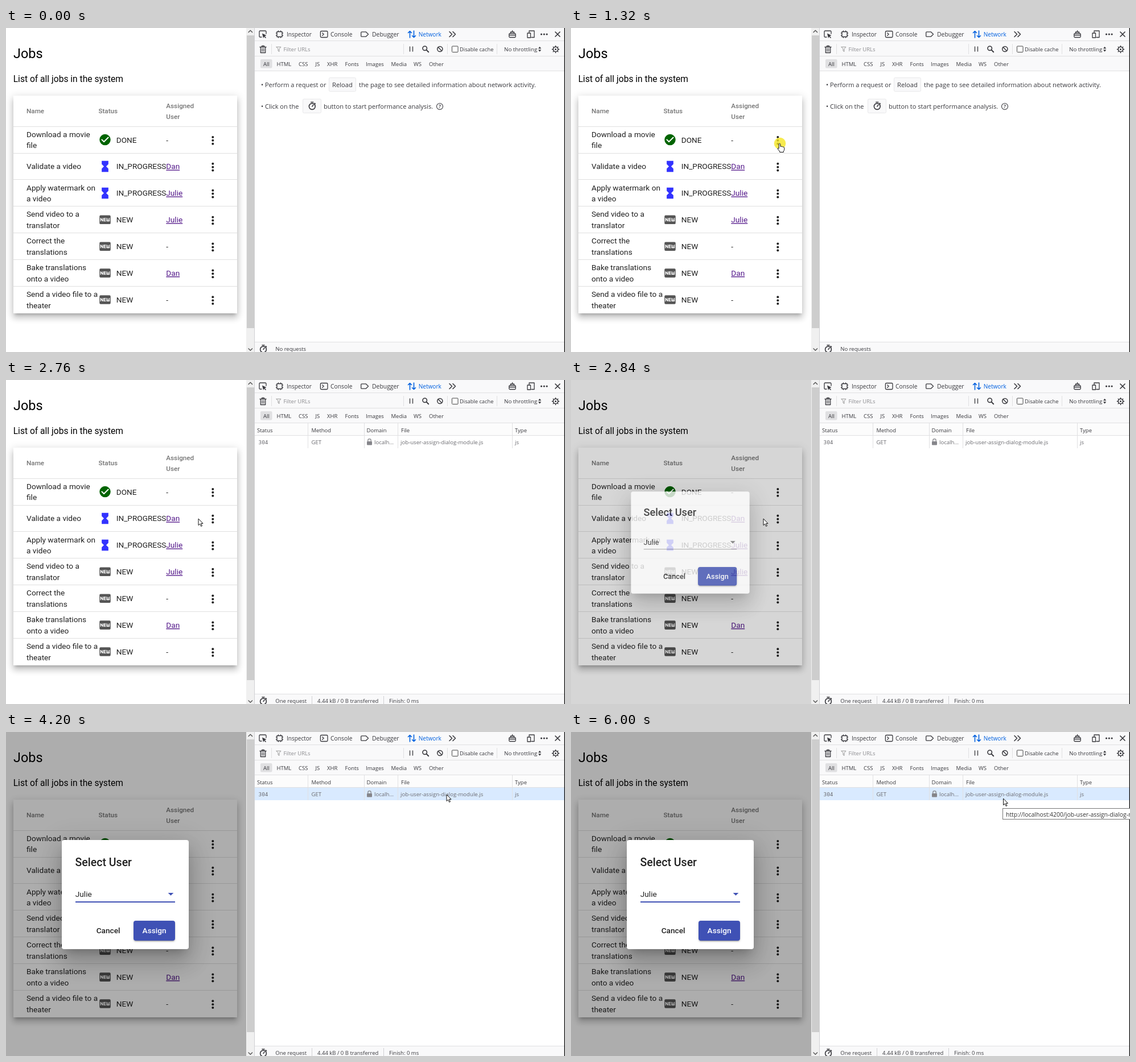
An HTML page that plays this animation: 982 by 570 pixels, repeating every 6400 ms.

```html
<!DOCTYPE html>
<html lang="en">
<head>
<meta charset="utf-8">
<title>Jobs</title>
<style>
html, body { margin: 0; width: 100%; height: 100%; overflow: hidden; background: #fff; }
svg { display: block; width: 982px; height: 570px; }
text { white-space: pre; }
.r { font-family: Roboto, sans-serif; fill: #212121; }
.o { font-family: "Open Sans", sans-serif; fill: #38383d; }
.m { font-family: "DejaVu Sans Mono", monospace; }
.b { font-weight: 500; }
.link { fill: #551a8b; text-decoration: underline; }
.ln { fill: none; stroke: #38383d; stroke-width: 1.3; stroke-linecap: round; stroke-linejoin: round; }
foreignObject { overflow: visible; }
.box { width: 100%; height: 100%; background: #fff; border-radius: 4px; }
.card { border-radius: 0; box-shadow: 0 5px 5px -3px rgba(0,0,0,.2), 0 8px 10px 1px rgba(0,0,0,.14), 0 3px 14px 2px rgba(0,0,0,.12); }
.menu { box-shadow: 0 2px 4px -1px rgba(0,0,0,.2), 0 4px 5px rgba(0,0,0,.14), 0 1px 10px rgba(0,0,0,.12); }
.dialog { box-shadow: 0 11px 15px -7px rgba(0,0,0,.2), 0 24px 38px 3px rgba(0,0,0,.14), 0 9px 46px 8px rgba(0,0,0,.12); }
.btn { background: #3f51b5; box-shadow: 0 3px 1px -2px rgba(0,0,0,.2), 0 2px 2px rgba(0,0,0,.14), 0 1px 5px rgba(0,0,0,.12); }
</style>
</head>
<body>
<svg id="stage" viewBox="0 0 982 570"></svg>
<script>
const LOOP = 6400, STEP = 40;
const stage = document.getElementById('stage');

// Markup helpers
const text = (x, y, s, size, cls = 'o', extra = '') =>
  `<text x="${x}" y="${y}" font-size="${size}" class="${cls}" ${extra}>${s}</text>`;
const rect = (x, y, w, h, fill, extra = '') =>
  `<rect x="${x}" y="${y}" width="${w}" height="${h}" fill="${fill}" ${extra}/>`;
const box = (x, y, w, h, cls) =>
  `<foreignObject x="${x}" y="${y}" width="${w}" height="${h}"><div class="box ${cls}"></div></foreignObject>`;
const line = (d, extra = '') => `<path class="ln" d="${d}" ${extra}/>`;
const at = (x, y, body) => `<g transform="translate(${x} ${y})">${body}</g>`;
const group = (id, body, extra = '') => `<g id="${id}" ${extra}>${body}</g>`;
const icon = (name, x, y, fill) =>
  `<path transform="translate(${x} ${y}) scale(.975) translate(-12 -12)" fill="${fill}" d="${ICONS[name]}"/>`;

const ICONS = {
  done: 'M12 2a10 10 0 1 0 0 20 10 10 0 0 0 0-20zm-2 15l-5-5 1.41-1.41L10 14.17l7.59-7.59L19 8z',
  busy: 'M6 2v6l4 4-4 4v6h12v-6l-4-4 4-4V2z',
  fresh: 'M20 4H4q-2 0-2 2v12q0 2 2 2h16q2 0 2-2V6q0-2-2-2zM8.5 15H7.3l-2.55-3.5V15H3.5V9h1.2l2.6 3.5V9h1.2zm5-4.74H11v1.12h2.5v1.26H11v1.11h2.5V15h-4V9h4zm7 3.74q0 1-1 1h-4q-1 0-1-1V9h1.25v4.51h1.13V10h1.25v3.5h1.12V9h1.25z',
  assign: 'M9 17l3-2.94c-.39-.04-.68-.06-1-.06-2.67 0-8 1.34-8 4v2h9zm2-5a4 4 0 1 0 0-8 4 4 0 0 0 0 8m4.47 8.5L12 17l1.4-1.41 2.07 2.08 5.13-5.17 1.4 1.41z',
  repeat: 'M7 7h10v3l4-4-4-4v3H5v6h2zm10 10H7v-3l-4 4 4 4v-3h12v-6h-2z'
};
const STATUS = { DONE: ['done', '#006400'], IN_PROGRESS: ['busy', '#3333ff'], NEW: ['fresh', '#555'] };
const JOBS = [
  ['Download a movie|file', 'DONE', '-'],
  ['Validate a video', 'IN_PROGRESS', 'Dan'],
  ['Apply watermark on|a video', 'IN_PROGRESS', 'Julie'],
  ['Send video to a|translator', 'NEW', 'Julie'],
  ['Correct the|translations', 'NEW', '-'],
  ['Bake translations|onto a video', 'NEW', 'Dan'],
  ['Send a video file to a|theater', 'NEW', '-']
];

function jobRow([name, status, user], i) {
  const y = 196.6 + 46.9 * i, base = y + 4.9;
  const lines = name.split('|');
  const dots = [-5.85, 0, 5.85].map(d => `<circle cx="363.3" cy="${y + 1.2 + d}" r="2" fill="#212121"/>`);
  return rect(13, Math.round(y - 24), 393, 1, '#e0e0e0') +
    lines.map((s, k) => text(36, base + (k - (lines.length - 1) / 2) * 19.5, s, 13.65, 'r')).join('') +
    icon(STATUS[status][0], 174, y, STATUS[status][1]) +
    text(193.7, base, status, 13.65, 'r') +
    text(281.3, base, user, 13.65, user === '-' ? 'r' : 'r link') + dots.join('');
}

function page() {
  const head = (x, y, s) => text(x, y, s, 11.7, 'r b', 'style="fill:#757575"');
  return text(13, 53, 'Jobs', 23.4, 'r', 'style="fill:#000"') +
    text(12.7, 95.2, 'List of all jobs in the system', 15.6, 'r', 'style="fill:#000"') +
    box(13, 119, 393, 382.6, 'card') +
    head(36, 150.4, 'Name') + head(162.4, 150.4, 'Status') +
    head(281.3, 140.6, 'Assigned') + head(281.3, 160, 'User') +
    JOBS.map(jobRow).join('');
}

const scrollbar = () => rect(422, 0, 14.5, 570, '#f0f0f0') +
  rect(423, 13, 13, 515, '#cdcdcd', 'id="thumb"') +
  line('M426 7.5l3.3-3.3 3.3 3.3M426 564l3.3 3.3 3.3-3.3', 'style="stroke:#505050"');

const watch = (x, y) => at(x, y,
  '<circle class="ln" cy="1" r="5.4" style="stroke-width:1.6"/>' + line('M-2-6.5H2M0 1L2-1.5M4.3-4.6l1.2 1', 'style="stroke-width:1.6"'));

function tabIcons() {
  const blue = 'style="stroke:#0060df;stroke-width:1.6"';
  let teeth = '';
  for (let i = 0; i < 8; i++) teeth += `<path class="ln" d="M0-4.3V-6.2" transform="rotate(${i * 45})"/>`;
  return at(451, 11, line('M6-1V-4.5Q6-6 4.5-6H-4.5Q-6-6-6-4.5V3.5Q-6 5-4.5 5H-2') +
      '<path d="M-1-1.5L6.5 2 3.6 3.2 6 6 5 7 2.3 4.2 1 7Z" fill="#38383d"/>') +
    at(480.5, 11, line('M-4.5-4.5H4.5V4.5H-4.5ZM-2-4.5V-6M2-4.5V-6M-2 4.5V6M2 4.5V6M-4.5-2H-6M-4.5 2H-6M4.5-2H6M4.5 2H6')) +
    at(558.7, 11, '<rect class="ln" x="-6.3" y="-5.5" width="12.6" height="11" rx="1.8"/>' + line('M-3-2.2L-.5 0-3 2.2')) +
    at(630, 11, line('M-5-4.2H2.2L6.5 0 2.2 4.2H-5Q-6.3 4.2-6.3 3V-3Q-6.3-4.2-5-4.2Z')) +
    at(713, 11, line('M-3.5 6V-5.5M-6.5-2.5L-3.5-5.5-.5-2.5M3.5-6V5.5M.5 2.5L3.5 5.5 6.5 2.5', blue)) +
    at(784, 11, line('M-5-4.5L-.5 0-5 4.5M1-4.5L5.5 0 1 4.5', 'style="stroke-width:1.6"')) +
    at(889.5, 11, '<rect class="ln" x="-5.7" y="-1.5" width="11.4" height="7" rx="1.5"/>' + line('M-3-1.5V-4H3V-1.5M0-4V-6.5M-5 1.5H5')) +
    at(922, 11, line('M-3-2V-6H6V5.5H1M-6-2H-.5V6H-6Z')) +
    [940.5, 945.3, 950.1].map(x => `<circle cx="${x}" cy="11" r="1.6" fill="#38383d"/>`).join('') +
    at(969, 11, line('M-4-4L4 4M4-4L-4 4', 'style="stroke-width:1.7"')) +
    at(451.5, 37.5, line('M-5.5-4H5.5M-2-4V-6H2V-4M-4.2-4V6H4.2V-4M-1.5-1.5V3.5M1.5-1.5V3.5')) +
    at(479, 37.3, line('M-4-4H4L1-.5V4.2L-1 2.8V-.5Z', 'style="stroke:#999;stroke-width:1"')) +
    line('M709.5 33V41M714.5 33V41') +
    at(737, 37, '<circle class="ln" cx="-1.3" cy="-1.3" r="3.7" style="stroke-width:1.6"/>' + line('M1.6 1.6L5.2 5.2', 'style="stroke-width:2"')) +
    at(762.3, 37, '<circle class="ln" r="4.6" style="stroke-width:1.5"/>' + line('M-3.2-3.2L3.2 3.2', 'style="stroke-width:1.5"')) +
    rect(783.5, 32, 10.5, 10.5, '#fff', 'stroke="#444" stroke-width="1" rx="1"') +
    '<path d="M935 36.3L937.6 32.8 940.2 36.3ZM935 38.3L937.6 41.8 940.2 38.3Z" fill="#38383d"/>' +
    at(965.5, 37.5, '<circle class="ln" r="4.2" style="stroke-width:1.6"/><circle r="1.5" fill="#38383d"/>' + teeth);
}

function devtools() {
  const tabs = [[493, 'Inspector', 10], [570, 'Console', 10.3], [643, 'Debugger', 10.4]];
  const kinds = { 452: 'All', 475.5: 'HTML', 514: 'CSS', 543.5: 'JS', 564: 'XHR', 595.5: 'Fonts', 632: 'Images', 676.5: 'Media', 716: 'WS', 743: 'Other' };
  return rect(436, 0, 546, 570, '#fff') + rect(437, 0, 545, 75, '#f9f9fa') +
    [22, 49, 75].map(y => rect(437, y, 545, 1, '#e0e0e2')).join('') +
    [466, 698, 775, 862].map(x => rect(x, 28, 1, 18, '#e0e0e2')).join('') +
    tabs.map(([x, s, size]) => text(x, 14.8, s, size)).join('') +
    text(724.7, 14.8, 'Network', 10.1, 'o', 'style="fill:#0060df"') +
    text(487.5, 40.7, 'Filter URLs', 9.5, 'o', 'style="fill:#8a8a8e"') +
    text(797, 40.7, 'Disable cache', 9.3) + text(875, 40.7, 'No throttling', 9.8) +
    rect(447, 55, 20.5, 15.5, '#e0e0e2', 'rx="2"') +
    Object.entries(kinds).map(([x, s]) => text(x, 66.5, s, 9.5)).join('') +
    tabIcons();
}

const footer = () => rect(437, 552, 545, 18, '#f9f9fa') + rect(437, 552, 545, 1, '#e0e0e2') + watch(452, 564.5);

function emptyPanel() {
  const soft = 'rx="2" stroke="#e8e8ea"';
  return text(448, 104, '• Perform a request or', 11) +
    rect(567.5, 87.5, 47, 24, '#f9f9fa', soft) + text(573, 104, 'Reload', 11.2) +
    text(620, 104, 'the page to see detailed information about network activity.', 11.2) +
    text(448, 141.5, '• Click on the', 11) +
    rect(521.5, 125, 32, 24.5, '#f9f9fa', soft) + watch(537.8, 137) +
    text(558, 141.5, 'button to start performance analysis.', 11.1) +
    '<circle class="ln" cx="762" cy="138" r="5.5" style="stroke-width:1.1"/>' +
    text(762, 141.3, '?', 9, 'o', 'text-anchor="middle" font-weight="600"') +
    text(473.3, 568, 'No requests', 9.5);
}

function requestPanel() {
  const heads = { 441: 'Status', 536.5: 'Method', 633.5: 'Domain', 694: 'File', 894: 'Type' };
  const cells = { 536.5: 'GET', 647: 'localh...', 693: 'job-user-assign-dialog-module.js', 894: 'js' };
  const grey = 'style="fill:#6b6b70"';
  return rect(437, 76, 545, 21, '#fcfcfc') + rect(437, 97, 545, 1, '#e0e0e2') +
    rect(437, 98, 545, 22, '#d9eaff', 'id="rowHover"') +
    [530, 629, 688, 889].map(x => rect(x, 76, 1, 44, '#e0e0e2')).join('') +
    Object.entries(heads).map(([x, s]) => text(x, 91.5, s, 9.5)).join('') +
    text(443.5, 113.3, '304', 9.4, 'm', grey) +
    Object.entries(cells).map(([x, s]) => text(x, 113.2, s, 9.6, 'o', grey)).join('') +
    rect(634, 108, 9, 6.5, '#85858a', 'rx="1"') +
    line('M635.8 108V106.3a2.7 2.7 0 0 1 5.4 0V108', 'style="stroke:#85858a"') +
    text(473.3, 568.3, 'One request', 9.5) + text(547, 568.3, '4.44 kB / 0 B transferred', 9.5) +
    text(673, 568.3, 'Finish: 0 ms', 9.5) +
    rect(537, 556, 1, 14, '#d0d0d3') + rect(663, 556, 1, 14, '#d0d0d3');
}

const menu = () => box(224, 216.3, 158.5, 109.5, 'menu') +
  icon('assign', 251, 249, '#757575') + text(278.8, 252.2, 'Assign to User', 13.65, 'r') +
  icon('repeat', 251.3, 295.3, '#757575') + text(278.8, 299.3, 'Restart', 13.65, 'r');

const dialog = () => box(98, 190, 223, 192.3, 'dialog') +
  text(121.6, 235.7, 'Select User', 19.5, 'r b') +
  text(121.8, 290.3, 'Julie', 13.65, 'r') +
  rect(122, 298, 175, 1, '#949494') + rect(122, 298, 175, 1.3, '#3f51b5', 'id="focusLine"') +
  '<path id="caret" d="M284.7 283H294.3L289.5 287.8Z"/>' +
  text(158.7, 354, 'Cancel', 13.65, 'r b') +
  box(224, 332, 73, 34.6, 'btn') + text(239.6, 354, 'Assign', 13.65, 'r b', 'style="fill:#fff"');

const tooltip = () => rect(758.5, 134.5, 240, 19, '#fff', 'stroke="#767676"') +
  text(764, 148.8, 'http://localhost:4200/job-user-assign-dialog-module.js', 10.45, 'o', 'style="fill:#333"');

const pointers = () => '<circle id="click" r="10.3" fill="#f5e61e" opacity=".78"/>' +
  '<g id="cursor" fill="#fff" stroke="#111" stroke-width="1" stroke-linejoin="round">' +
  '<path id="arrow" d="M0 0V11.6L2.7 9.1 4.6 13.4 6.5 12.6 4.6 8.4H8Z"/>' +
  '<path id="hand" d="M-1.3 1Q0-.8 1.3 1V5.3Q2.8 4.6 3.8 5.8 5.2 5.2 6.1 6.4 7.8 6 8.2 7.6V10.5Q8.2 12.5 6.8 13.8V15.5H.2V14L-3.6 9.6Q-4-.1+8 7.8-1.3 9Z"/></g>';

stage.innerHTML = page() + rect(0, 0, 422, 570, '#000', 'id="backdrop"') + scrollbar() +
  '<circle id="ripple" cx="363.3" cy="197.8" fill="#000"/>' + group('menu', menu()) + group('dialog', dialog()) +
  devtools() + footer() + group('empty', emptyPanel()) + group('requests', requestPanel()) +
  rect(436, 0, 1, 570, '#d0d0d3') + rect(980.7, 0, 1.3, 570, '#111') + group('tooltip', tooltip()) + pointers();

const el = {};
stage.querySelectorAll('[id]').forEach(n => el[n.id] = n);
el.hand.setAttribute('d', 'M-1.3 1Q0-.8 1.3 1V5.3Q2.8 4.6 3.8 5.8 5.2 5.2 6.1 6.4 7.8 6 8.2 7.6V10.5Q8.2 12.5 6.8 13.8V15.5H.2V14L-3.6 9.6Q-4 7.8-1.3 9Z');

// Motion helpers
const clamp = v => Math.min(1, Math.max(0, v));
const span = (t, from, length) => clamp((t - from) / length);
const during = (t, a, b) => t >= a && t < b;
const show = (node, on) => node.setAttribute('display', on ? 'inline' : 'none');
const set = (node, attrs) => { for (const k in attrs) node.setAttribute(k, attrs[k]); };
const scaleAt = (s, x, y) => `translate(${x} ${y}) scale(${s}) translate(${-x} ${-y})`;

function bezier(x1, y1, x2, y2) {
  const f = (a, b, s) => 3 * (1 - s) ** 2 * s * a + 3 * (1 - s) * s * s * b + s ** 3;
  return x => {
    let lo = 0, hi = 1;
    for (let i = 0; i < 20; i++) {
      const mid = (lo + hi) / 2;
      if (f(x1, x2, mid) < x) lo = mid; else hi = mid;
    }
    return f(y1, y2, hi);
  };
}
const easeOut = bezier(0, 0, .2, 1);
const swift = bezier(.25, .8, .25, 1);
const glide = bezier(.4, .1, .6, .9);

// Pointer stops: time, x, y
const PATH = [
  [240, 829, 572], [920, 372, 209], [1040, 366.5, 203], [2080, 366.5, 203], [2120, 364, 208],
  [2320, 338, 244], [3480, 338, 244], [3520, 341, 241], [4160, 773, 111], [4200, 774, 110],
  [4320, 774, 110], [4600, 793, 108], [5000, 749, 115], [5260, 797, 113], [5520, 759.5, 117]
];

function pointer(t) {
  const i = PATH.findIndex(p => p[0] > t);
  if (i < 0) return PATH[PATH.length - 1].slice(1);
  if (i === 0) return PATH[0].slice(1);
  const [ta, xa, ya] = PATH[i - 1], [tb, xb, yb] = PATH[i];
  const k = glide((t - ta) / (tb - ta));
  return [xa + (xb - xa) * k, ya + (yb - ya) * k];
}

function draw(t) {
  const [x, y] = pointer(t);
  const overButton = during(t, 280, 1400) && Math.hypot(x - 363, y - 198) < 20;
  const overItem = during(t, 2120, 2720) && y > 224;
  const hand = overButton || overItem;
  show(el.cursor, t >= 280);
  show(el.hand, hand);
  show(el.arrow, !hand);
  set(el.cursor, { transform: `translate(${x} ${y})` });
  show(el.click, during(t, 1320, 1440) || during(t, 2600, 2720));
  set(el.click, { cx: x + .5, cy: y });
  set(el.thumb, { fill: t < 920 && x > 422 && x < 437 ? '#a6a6a6' : '#cdcdcd' });

  show(el.ripple, during(t, 1360, 1640));
  set(el.ripple, { r: 19.5 * easeOut(span(t, 1320, 200)), opacity: .1 * (1 - span(t, 1440, 180)) });

  const open = easeOut(span(t, 1340, 120));
  show(el.menu, during(t, 1360, 2760));
  set(el.menu, {
    opacity: open * (1 - span(t, 2660, 100)),
    transform: scaleAt(.8 + .2 * open, 382.5, 216.3)
  });

  const grow = easeOut(span(t, 2776, 150));
  show(el.dialog, t >= 2800);
  set(el.dialog, { opacity: grow, transform: scaleAt(.7 + .3 * grow, 209.5, 286.2) });
  set(el.backdrop, { opacity: .32 * swift(span(t, 2776, 400)) });
  const focus = swift(span(t, 2860, 300));
  set(el.focusLine, {
    x: 209.5 - 87.5 * focus, width: 175 * focus,
    height: t < 3280 ? 1.1 : t < 3560 ? 1.3 : 2
  });
  set(el.caret, { fill: t < 2880 ? '#757575' : '#3f51b5' });

  const loaded = t >= 2760;
  show(el.empty, !loaded);
  show(el.requests, loaded);
  show(el.rowHover, t > 3520 && x > 437 && y > 97 && y < 120);
  show(el.tooltip, t >= 6000);
}

const start = performance.now();
function tick() {
  const t = (performance.now() - start) % LOOP;
  draw(Math.floor(t / STEP) * STEP);
  requestAnimationFrame(tick);
}
tick();
</script>
</body>
</html>
```
